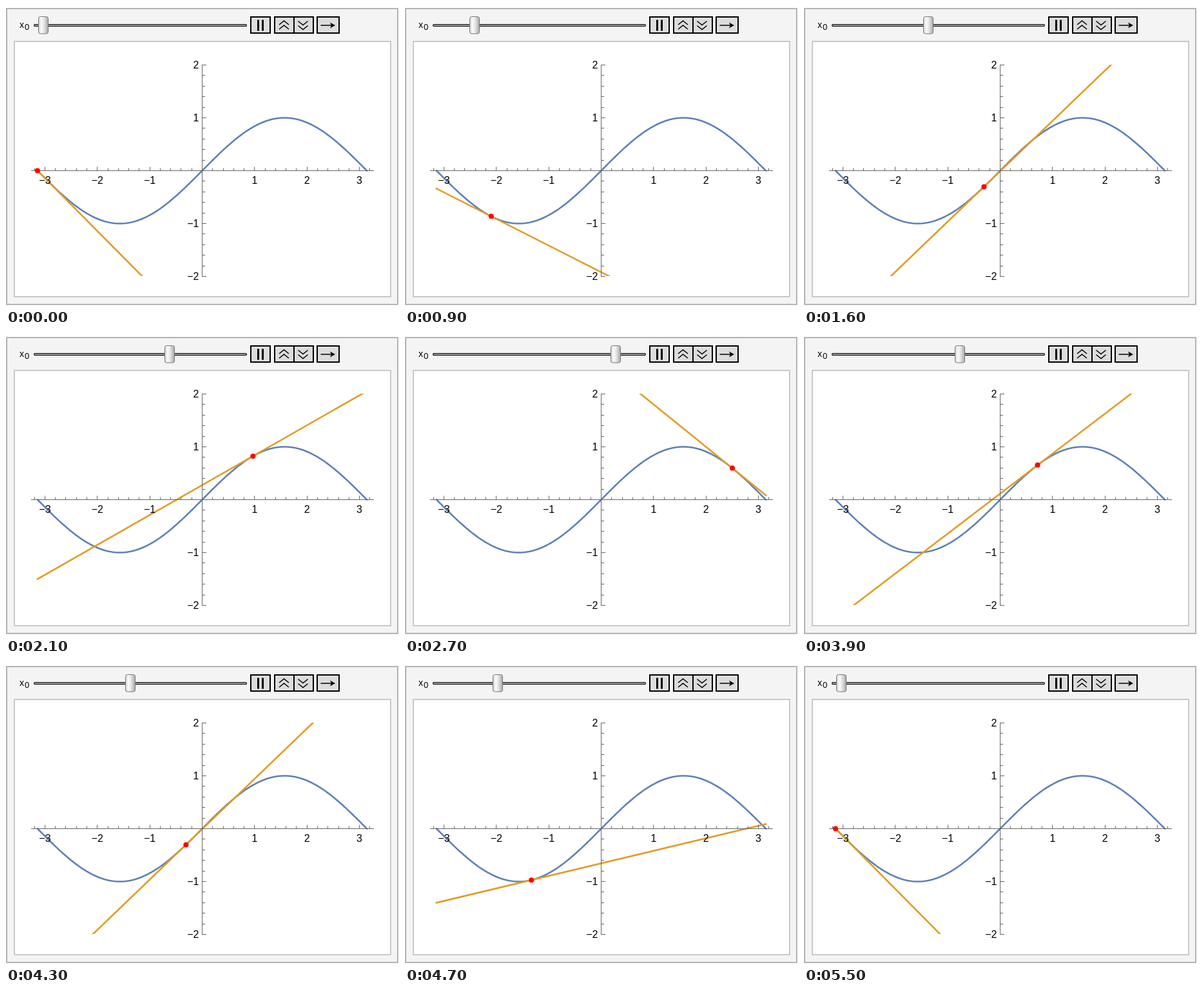
These frames come from a looping animation (610 px wide and 467 px high, 6000 ms). An HTML page:

```html
<!DOCTYPE html>
<html lang="en">
<head>
<meta charset="utf-8">
<title>Tangent to a sine curve</title>
<style>
  html, body { margin: 0; width: 100%; height: 100%; overflow: hidden; background: #fff; }
  svg { display: block; }
  text { font-family: "Liberation Sans", Arial, sans-serif; fill: #000; }
  #labels text { font-size: 16px; }
  #axes { stroke: #666; stroke-width: 1; fill: none; }
  .plot { fill: none; stroke-width: 2.6; stroke-linecap: square; stroke-linejoin: round; }
  .button { fill: #dcdcdc; stroke: #000; stroke-width: 2; }
  .icon { fill: none; stroke: #000; stroke-width: 1.6; }
</style>
</head>
<body>
<svg width="610" height="467" viewBox="0 0 610 467">
  <defs>
    <linearGradient id="knob">
      <stop offset="0" stop-color="#d2d2d2"/>
      <stop offset=".3" stop-color="#fbfbfb"/>
      <stop offset=".55" stop-color="#e6e6e6"/>
      <stop offset="1" stop-color="#a8a8a8"/>
    </linearGradient>
    <clipPath id="area"><rect x="40" y="91" width="530" height="328"/></clipPath>
  </defs>

  <rect x="1" y="4" width="607" height="459" fill="#f4f4f4" stroke="#b4b4b4" stroke-width="2"/>
  <rect x="13" y="55" width="584" height="396" fill="#fff" stroke="#c9c9c9" stroke-width="2"/>

  <text x="21" y="34" font-size="14">x</text>
  <text x="29" y="37" font-size="13">0</text>
  <rect x="43.5" y="28.5" width="330" height="3" rx="1.5" fill="#999" stroke="#111" stroke-width="1.2"/>
  <rect id="thumb" x="-7.5" y="16.5" width="15" height="26.5" rx="3" fill="url(#knob)" stroke="#777"/>

  <g class="button">
    <rect x="380" y="17" width="30" height="25"/>
    <rect x="417" y="17" width="30" height="25"/>
    <rect x="447" y="17" width="30" height="25"/>
    <rect x="483" y="17" width="34" height="25"/>
  </g>
  <path d="M390 21.500h3v17h-3zM397 21.500h3v17h-3z"/>
  <path class="icon" d="M424 29l7.500 -6 7.500 6M424 36l7.500 -6 7.500 6M453.500 23.500l7.500 6 7.500 -6M453.500 30.500l7.500 6 7.500 -6M488.500 30h18"/>
  <path d="M503 25.500l8 4.500 -8 4.500 2 -4.500z"/>

  <path id="curve" class="plot" stroke="#5e81b5"/>
  <path id="tangent" class="plot" stroke="#e19c24" clip-path="url(#area)"/>
  <path id="axes"/>
  <g id="labels"></g>
  <circle id="dot" r="4" fill="#f00"/>
</svg>

<script>
const $ = id => document.getElementById(id);
const px = x => 304.5 + 81.35 * x;
const py = y => 255.5 - 82 * y;
const point = (x, y) => px(x).toFixed(2) + ' ' + py(y).toFixed(2);

function addLabel(value, x, y, anchor) {
  const text = document.createElementNS('http://www.w3.org/2000/svg', 'text');
  text.textContent = String(value).replace('-', '\u2212');
  text.setAttribute('x', x);
  text.setAttribute('y', y);
  text.setAttribute('text-anchor', anchor);
  $('labels').append(text);
}

function drawAxes() {
  let d = 'M39 255.5H571M304.5 91V420';
  for (let i = -16; i <= 16; i++) {
    const major = i % 5 === 0;
    const size = major ? 6 : 4;
    const x = Math.floor(px(i / 5)) + 0.5;
    const y = Math.floor(py(i / 5)) + 0.5;
    if (i) d += `M${x} 255.5v${-size}`;
    if (major && i) addLabel(i / 5, px(i / 5), 276, 'middle');
    if (Math.abs(i) > 10) continue;
    if (i) d += `M304.5 ${y}h${size + 0.5}`;
    if (major && i) addLabel(i / 5, 299.5, y + 5.5, 'end');
  }
  $('axes').setAttribute('d', d);
}

function drawCurve() {
  const points = [];
  for (let i = 0; i <= 160; i++) {
    const x = -Math.PI + i * Math.PI / 80;
    points.push(point(x, Math.sin(x)));
  }
  $('curve').setAttribute('d', 'M' + points.join('L'));
}

// Progress 0..1..0 in 100 ms steps, resting at the left end
const LOOP = 6000, START = 500, END = 5500, STEP = 100;
const FIRST = 0.1 / 30, RATE = (1 - FIRST) / 24.5;

function progress(t) {
  if (t < START || t >= END) return 0;
  const u = FIRST + RATE * Math.floor((t - START) / STEP);
  return u > 1 ? 2 - u : u;
}

function render(t) {
  const p = progress(t);
  const x0 = Math.PI * (2 * p - 1);
  const y0 = Math.sin(x0), slope = Math.cos(x0);
  const end = x => point(x, y0 + slope * (x - x0));
  $('tangent').setAttribute('d', `M${end(-Math.PI)}L${end(Math.PI)}`);
  $('dot').setAttribute('cx', px(x0));
  $('dot').setAttribute('cy', py(y0));
  $('thumb').setAttribute('transform', `translate(${Math.round(58 + 300 * p)} 0)`);
}

drawAxes();
drawCurve();
const began = performance.now();
(function tick() {
  render((performance.now() - began) % LOOP);
  requestAnimationFrame(tick);
})();
</script>
</body>
</html>
```
